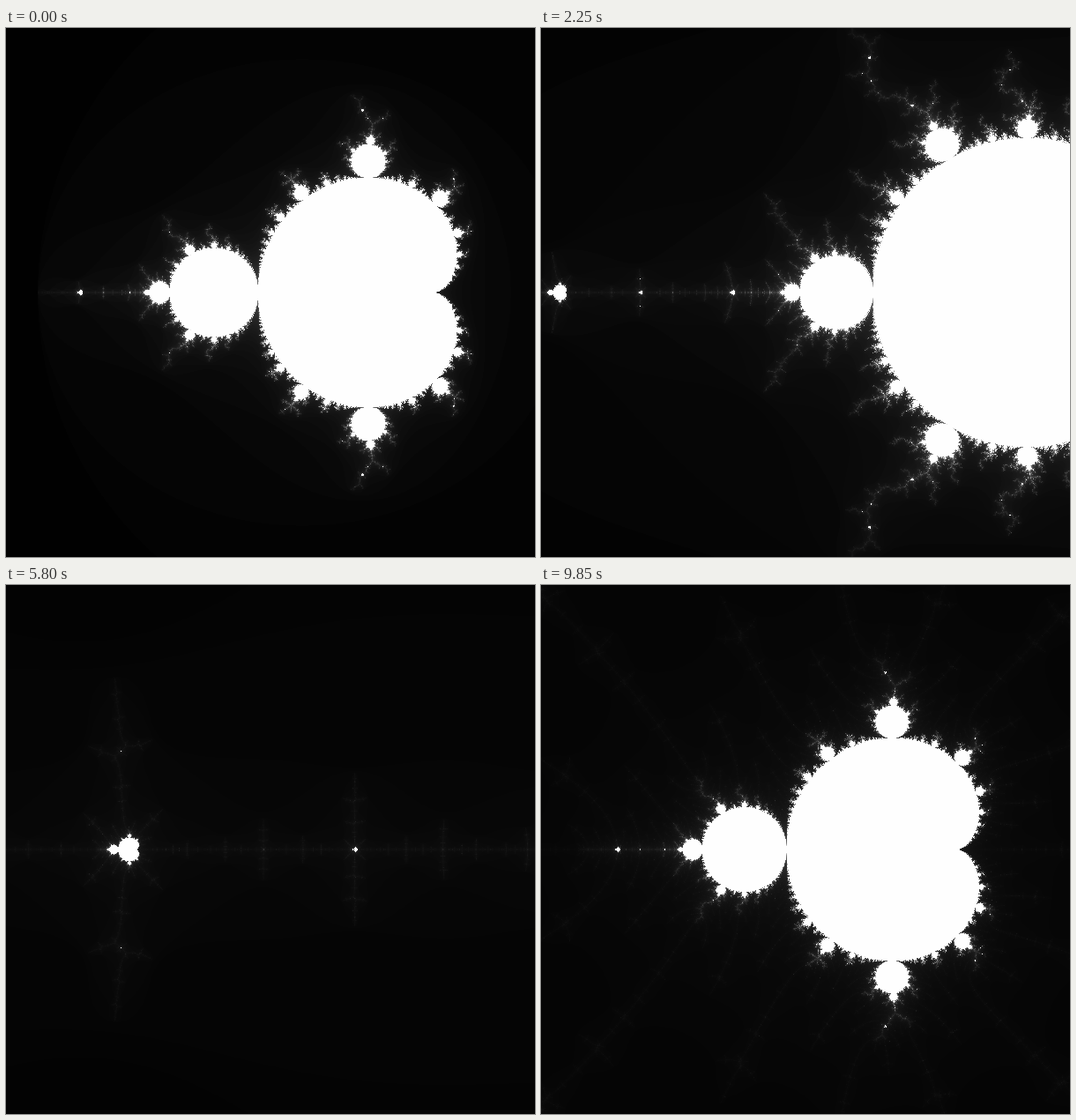
An HTML page with a canvas that plays this animation: 600 by 600 pixels, repeating every 9.9 s.

```html
<!DOCTYPE html>
<html lang="en">
<head>
<meta charset="utf-8">
<title>Mandelbrot zoom</title>
<style>
  html, body { margin: 0; width: 100%; height: 100%; overflow: hidden; background: #000; }
  canvas { display: block; width: 600px; height: 600px; }
</style>
</head>
<body>
<canvas id="view" width="600" height="600"></canvas>
<script>
const SIZE = 600, MID = (SIZE - 1) / 2;
const STEPS = 198, STEP_MS = 50;
const INSIDE = 254, SETTLED = 1e-10;

// The zoom grows by the size ratio of the period-5 copy, around a fixed point.
const FOCUS_C = -1.63196, FOCUS_X = 109.2;
const START_SCALE = 200, RATE = Math.log(246.374) / STEPS;

// The iteration limit rises with depth, so the surroundings stay dark.
const START_LIMIT = 128, LIMIT_RATE = 0.0096;

const ctx = document.getElementById('view').getContext('2d');
const image = ctx.createImageData(SIZE, SIZE);
const pixels = new Uint32Array(image.data.buffer);
const grey = v => (0xff000000 | v << 16 | v << 8 | v) >>> 0;

function escapeCount(a, b, limit) {
  // Skip the main cardioid and the period-2 disc.
  const b2 = b * b, p = a - 0.25, q = p * p + b2;
  if (q * (q + p) <= b2 / 4 || (a + 1) * (a + 1) + b2 <= 1 / 16) return limit;
  let x = 0, y = 0, x2 = 0, y2 = 0, n = 0;
  let oldX = 0, oldY = 0, nextSave = 8;
  while (n < limit && x2 + y2 <= 4) {
    y = 2 * x * y + b;
    x = x2 - y2 + a;
    x2 = x * x;
    y2 = y * y;
    n++;
    // An orbit that repeats never escapes.
    if (Math.abs(x - oldX) < SETTLED && Math.abs(y - oldY) < SETTLED) return limit;
    if (n === nextSave) {
      oldX = x;
      oldY = y;
      nextSave *= 2;
    }
  }
  return n;
}

function draw(step) {
  const scale = START_SCALE * Math.exp(RATE * step);
  const limit = Math.round(START_LIMIT * Math.exp(LIMIT_RATE * step));
  const shades = Uint32Array.from({ length: limit + 1 }, (_, n) => grey(Math.floor(INSIDE * n / limit)));
  for (let row = 0; row < SIZE / 2; row++) {
    const b = (MID - row) / scale;
    const top = row * SIZE, bottom = (SIZE - 1 - row) * SIZE;
    for (let col = 0; col < SIZE; col++) {
      const n = escapeCount(FOCUS_C + (col - FOCUS_X) / scale, b, limit);
      pixels[top + col] = pixels[bottom + col] = shades[n];
    }
  }
  ctx.putImageData(image, 0, 0);
}

const start = performance.now();
let shown = -1;

function tick(now) {
  const step = Math.floor(Math.max(0, now - start) / STEP_MS) % STEPS;
  if (step !== shown) draw(shown = step);
  requestAnimationFrame(tick);
}
tick(start);
</script>
</body>
</html>
```
